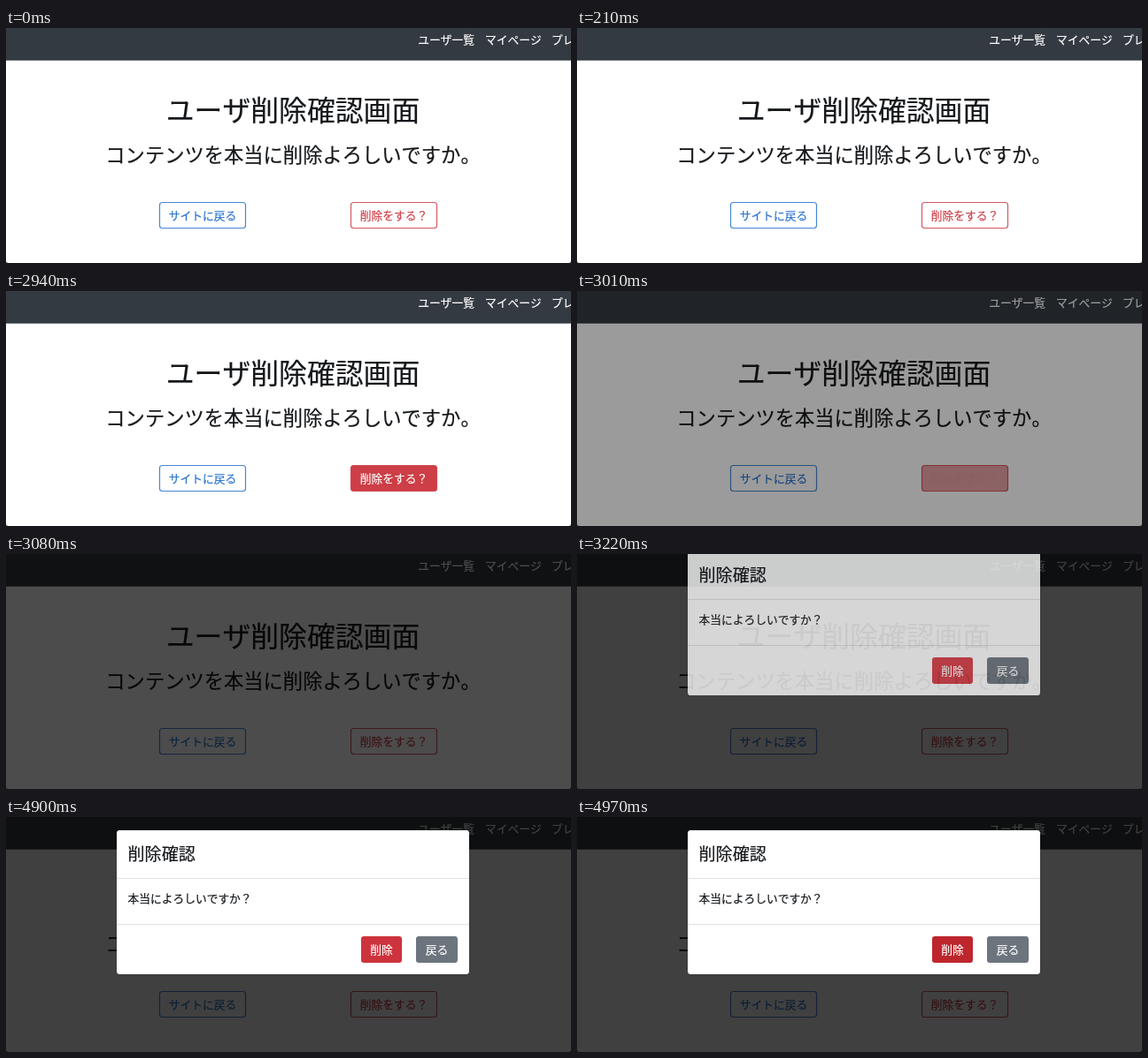
An HTML page that plays this animation: 638 px wide and 266 px high, repeating every 5.11 s.

```html
<!DOCTYPE html>
<html lang="ja">
<head>
<meta charset="utf-8">
<title>ユーザ削除確認画面</title>
<style>
  html, body { margin: 0; width: 100%; height: 100%; overflow: hidden; background: #fff; }
  svg { display: block; width: 638px; height: 266px; }
  text {
    font: 400 12.74px "Noto Sans CJK JP", "Noto Sans CJK", sans-serif;
    font-kerning: none;
    fill: #15181b;
    stroke: #15181b;
    stroke-width: .2px;
  }
  .mid { text-anchor: middle; }
  .light { fill: #fff; stroke: #fff; }
  .outline { stroke-width: 1.2px; stroke-opacity: .85; }
</style>
</head>
<body>
<svg viewBox="0 0 638 266">
  <rect width="638" height="266" fill="#fff"/>
  <rect width="638" height="36.75" fill="#343a41"/>
  <text class="light" x="465.2" y="18.2">ユーザ一覧</text>
  <text class="light" x="541" y="18.2">マイページ</text>
  <text class="light" x="616" y="18.2">プレビュー</text>
  <text class="mid" x="324" y="105" style="font-size:31.84px">ユーザ削除確認画面</text>
  <text class="mid" x="324" y="152" style="font-size:22.29px">コンテンツを本当に削除よろしいですか。</text>
  <g id="back">
    <rect class="outline" x="173.5" y="197.5" width="97" height="29" rx="3"/>
    <text class="mid" x="222" y="216.8">サイトに戻る</text>
  </g>
  <g id="remove">
    <rect class="outline" x="389.5" y="197.5" width="97" height="29" rx="3"/>
    <text class="mid" x="438" y="216.8">削除をする？</text>
  </g>
  <path d="M0 266v-3q0 3 3 3zM638 266v-3q0 3 -3 3z" fill="#555"/>
  <rect id="shade" width="638" height="266" opacity="0"/>

  <g id="dialog" opacity="0">
    <rect x="124.5" y="14.5" width="399" height="164" rx="4" fill="#000" fill-opacity=".2"/>
    <rect x="125" y="15" width="398" height="163" rx="3.4" fill="#fff"/>
    <path d="M125 69.5h398M125 121.5h398" stroke="#dee2e6"/>
    <text x="137.5" y="49" style="font-size:19.1px">削除確認</text>
    <text x="137.5" y="96.8">本当によろしいですか？</text>
    <rect id="confirm" x="401" y="135" width="46" height="30" rx="3.2"/>
    <text class="mid light" x="424" y="154.8">削除</text>
    <rect x="463" y="135" width="47" height="30" rx="3.2" fill="#6c757d"/>
    <text class="mid light" x="486.5" y="154.8">戻る</text>
  </g>
</svg>
<script>
  const LOOP = 5110, STEP = 70;
  const WHITE = [255, 255, 255];
  const BLUE = [42, 115, 205], RED = [205, 62, 70];
  const CONFIRM = [216, 60, 70], CONFIRM_HOVER = [190, 38, 45];

  const $ = id => document.getElementById(id);
  const ramp = (t, start, span) => Math.min(1, Math.max(0, (t - start) / span));
  const smooth = p => p * p * (3 - 2 * p);
  const mix = (a, b, p) => a.map((v, i) => v + (b[i] - v) * p);
  const css = c => `rgb(${c.map(Math.round).join()})`;

  // cubic-bezier(0, 0, .58, 1), solved for its parameter by bisection
  function easeOut(x) {
    let lo = 0, hi = 1;
    for (let i = 0; i < 20; i++) {
      const s = (lo + hi) / 2;
      if (1.74 * s * s * (1 - s) + s ** 3 < x) lo = s; else hi = s;
    }
    return lo * lo * (3 - 2 * lo);
  }

  function paintButton(id, ink, fill) {
    const [box, text] = $(id).children;
    box.style.stroke = box.style.fill = css(ink);
    box.style.fillOpacity = fill;
    text.style.stroke = text.style.fill = css(mix(ink, WHITE, fill));
  }

  function draw(t) {
    const hover = smooth(ramp(t, 2810, 125)) * (1 - smooth(ramp(t, 2944, 130)));
    paintButton("back", BLUE, 0);
    paintButton("remove", RED, hover);

    // two stacked half-black backdrops fade in together
    const veil = 1 - ramp(t, 2944, 150) / 2;
    $("shade").setAttribute("opacity", 1 - veil * veil);

    const slide = easeOut(ramp(t, 3082, 300));
    $("dialog").setAttribute("opacity", ramp(t, 3082, 175));
    $("dialog").setAttribute("transform", `translate(0 ${-50 * (1 - slide)})`);
    $("confirm").style.fill = css(mix(CONFIRM, CONFIRM_HOVER, ramp(t, 4850, 120)));
  }

  const begin = performance.now();
  function tick() {
    const t = (performance.now() - begin) % LOOP;
    draw(Math.floor(t / STEP) * STEP);
    requestAnimationFrame(tick);
  }
  tick();
</script>
</body>
</html>
```
